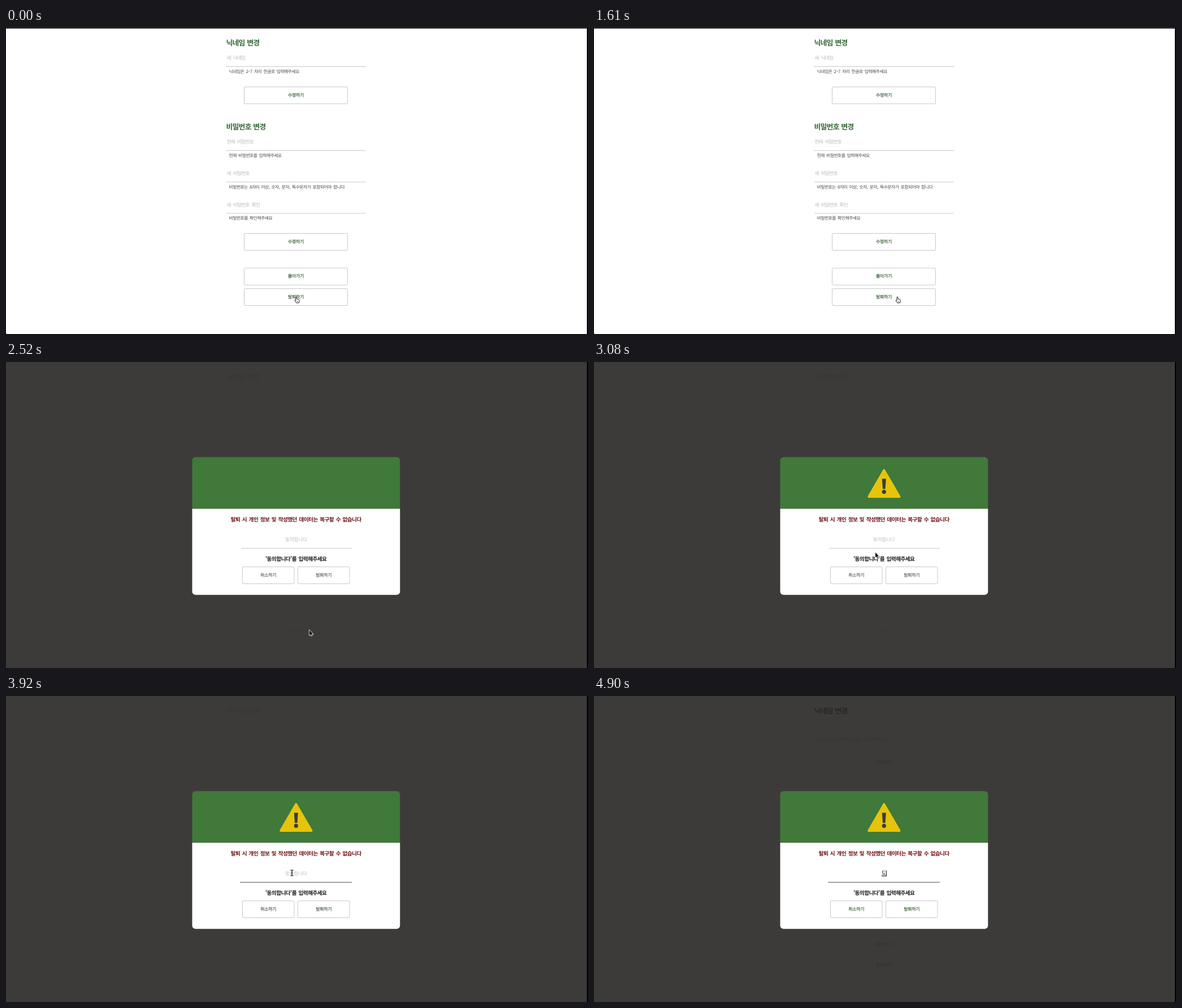
Write an HTML page that moves like this. It is 1030x543 px and loops after 4970 ms.

```html
<!DOCTYPE html>
<html lang="ko">
<head>
<meta charset="utf-8">
<style>
html, body { margin: 0; height: 100%; overflow: hidden; background: #fff }
svg { display: block; width: 1030px; height: 543px }
text { font-family: "Noto Sans CJK KR", "Noto Sans CJK", sans-serif; text-rendering: geometricPrecision }
.head { font-size: 13px; font-weight: 700; letter-spacing: -.9px; word-spacing: .8px; fill: #3a6b39 }
.field { font-size: 8.9px; font-weight: 300; letter-spacing: -.95px; word-spacing: 2.4px; fill: #bdbdbd }
.hint { font-size: 7.8px; letter-spacing: -.48px; word-spacing: 1.4px; fill: #484848 }
.label { font-size: 8px; font-weight: 500; letter-spacing: -.3px; color: #3c663a; fill: currentColor; stroke: currentColor; stroke-width: .2px }
.warn, .ask { font-size: 9.7px; font-weight: 700; letter-spacing: -.6px; word-spacing: 1.4px; fill: #6f1216 }
.ask { fill: #1c1c1c }
.agree { font-size: 8.7px; font-weight: 300; letter-spacing: -.3px; fill: #bdbdbd }
.typed { font-size: 10px; fill: #222 }
.ghost text { fill: #1c1a19; font-weight: 300; stroke: none }
.mid { text-anchor: middle }
.box { fill: #fff; stroke: #c9c9c9 }
.line { stroke: #c9c9c9 }
</style>
</head>
<body>
<svg viewBox="0 0 1030 543">
  <g id="page"></g>
  <g id="overlay">
    <rect width="1030" height="543" fill="#3d3b39"/>
    <g id="ghost" class="ghost"></g>
    <path d="M329.5 260.3H697.3V407.3a6 6 0 0 1-6 6H335.5a6 6 0 0 1-6-6z" fill="#fff"/>
    <path d="M329.5 260.3V174.7a6 6 0 0 1 6-6H691.3a6 6 0 0 1 6 6V260.3z" fill="#40793a"/>
    <g id="icon">
      <path d="M513.3 192 486.2 239H540.6z" fill="#e7c40b" stroke="#e7c40b" stroke-width="3.8" stroke-linejoin="round"/>
      <path d="M509.8 207.3H516.8L515.6 225.2H511z" fill="#3d3b39"/>
      <circle cx="513.3" cy="230.4" r="3.6" fill="#3d3b39"/>
    </g>
    <g id="dialog"></g>
    <path id="rule"/>
    <g id="typed">
      <text id="jamo" class="typed mid" x="513.2" y="314" dy=".38em"></text>
      <path d="M509 319.5H518" stroke="#222"/>
    </g>
    <path id="caret" d="M0 309.5V320" stroke="#222"/>
  </g>
  <path d="M1029 0V543" stroke="#000" stroke-width="2"/>
  <g id="hand"><path d="M-1 .9C-1-.4 .9-.4 .9 .9V3.8L4 4.5Q5.6 5 5.5 6.5L5.2 8.6 4.4 10.8H-.1L-2.6 7.3Q-3.4 5.9-2.2 5.7L-1 6.6z" fill="#fff" stroke="#111" stroke-width=".9" stroke-linejoin="round"/>
    <path d="M1.2 7V9.4M2.8 7V9.4" stroke="#333" stroke-width=".6"/></g>
  <path id="arrow" d="M0 0V8.8L2 7 3.3 10 4.8 9.3 3.5 6.5H6.2z" fill="#0c0c0c" stroke="#fff" stroke-width="1.4" paint-order="stroke"/>
  <g id="beam" fill="none">
    <path d="M-2.5-5Q0-5 0-3.5Q0-5 2.5-5M0-4V4M-2.5 5Q0 5 0 3.5Q0 5 2.5 5M-1.3 0H1.3" stroke="#fff" stroke-width="2.6"/>
    <path d="M-2.5-5Q0-5 0-3.5Q0-5 2.5-5M0-4V4M-2.5 5Q0 5 0 3.5Q0 5 2.5 5M-1.3 0H1.3" stroke="#2a2a2a" stroke-width="1.3"/>
  </g>
</svg>
<script>
const $ = id => document.getElementById(id);
const text = (cls, x, y, s, more = '') => `<text class="${cls}" x="${x}" y="${y}" dy=".38em" ${more}>${s}</text>`;
const button = (x, y, w, s) =>
  `<rect class="box" x="${x}" y="${y}" width="${w}" height="30" rx="1.5"/>` + text('label mid', x + w / 2, y + 14.3, s);
const field = (y, name, hint) => text('field', 390.5, y, name) +
  `<path class="line" d="M389.5 ${y + 15.5}H637"/>` + text('hint', 394.5, y + 24, hint);

$('page').innerHTML = '<path d="M0 .5H1030" stroke="#111"/><path d="M0 542.5H1" stroke="#111"/>' +
  text('head', 389.5, 26, '닉네임 변경') +
  field(53, '새 닉네임', '닉네임은 2~7 자리 한글로 입력해주세요') +
  button(421.5, 104.5, 183, '수정하기') +
  text('head', 389.5, 174.7, '비밀번호 변경') +
  field(202, '현재 비밀번호', '현재 비밀번호를 입력해주세요') +
  field(257.7, '새 비밀번호', '비밀번호는 8자리 이상, 숫자, 문자, 특수문자가 포함되어야 합니다') +
  field(313.3, '새 비밀번호 확인', '비밀번호를 확인해주세요') +
  button(421.5, 364.5, 183, '수정하기') +
  button(421.5, 426, 183, '돌아가기') +
  button(421.5, 462.5, 183, '탈퇴하기');

$('ghost').innerHTML =
  text('head', 389.5, 26, '닉네임 변경') +
  text('hint', 394.5, 77, '닉네임은 2~7 자리 한글로 입력해주세요', 'opacity=".2"') +
  [['수정하기', 118], ['돌아가기', 440.5], ['탈퇴하기', 477]]
    .map(([s, y]) => text('label mid', 513, y, s, 'opacity=".3"')).join('');

$('dialog').innerHTML =
  text('warn mid', 513.2, 279, '탈퇴 시 개인 정보 및 작성했던 데이터는 복구할 수 없습니다') +
  text('agree mid', 513.2, 314.5, '동의합니다', 'id="agree"') +
  text('ask mid', 513.2, 349, "'동의합니다'를 입력해주세요") +
  button(418.5, 363.5, 91.5, '취소하기') + button(516.5, 363.5, 91.5, '탈퇴하기');
const labels = $('dialog').querySelectorAll('.label');

const LOOP = 4970, STEP = 70;
const OPEN = 2520, FOCUS = 3360, REFRESH = 4480, TYPE = 4830;
const span = (t, a, b) => Math.min(1, Math.max(0, (t - a) / (b - a)));
const smooth = p => p * p * (3 - 2 * p);
const mix = (a, b, p) => a + (b - a) * p;
const show = (id, on) => $(id).style.display = on ? '' : 'none';
const place = (id, x, y) => $(id).setAttribute('transform', `translate(${x} ${y})`);

function draw(ms) {
  const t = Math.floor(ms / STEP) * STEP;
  const open = t >= OPEN, typed = t >= TYPE;
  show('page', !open);
  show('overlay', open);
  show('icon', t >= 2660);
  show('typed', typed);
  $('jamo').textContent = t > TYPE ? '도' : 'ㄷ';
  show('agree', !typed);
  show('caret', typed || t >= FOCUS && t < 3920 || t >= 4340);
  place('caret', typed ? 517.5 : 513.5, 0);
  $('ghost').style.opacity = t >= REFRESH ? .9 : .12;

  const focus = span(t, FOCUS - STEP, 3500), grey = mix(201, 85, focus);
  $('rule').setAttribute('d', `M${mix(416, 414, focus)} 330.5H612`);
  $('rule').setAttribute('stroke', `rgb(${grey},${grey},${grey})`);
  const ink = t >= REFRESH ? '#46693f' : t >= FOCUS ? '#52625a' : '#696a62';
  labels.forEach(l => l.style.color = ink);

  show('hand', t < 2450);
  show('arrow', t >= 2450 && t < 3150);
  show('beam', t >= 3150 && !typed);
  place('hand', mix(513.8, 537, smooth(span(t, 1050, 1610))), 477);
  const rise = smooth(span(t, 2730, 3080)), settle = smooth(span(t, 3080, 3290));
  const x = mix(537, 498, rise) + 8 * settle, y = mix(476, 338, rise) - 24 * settle;
  place('arrow', x, y);
  place('beam', x, y);
}

function tick(now) {
  draw(now % LOOP);
  requestAnimationFrame(tick);
}
draw(0);
requestAnimationFrame(tick);
</script>
</body>
</html>
```
